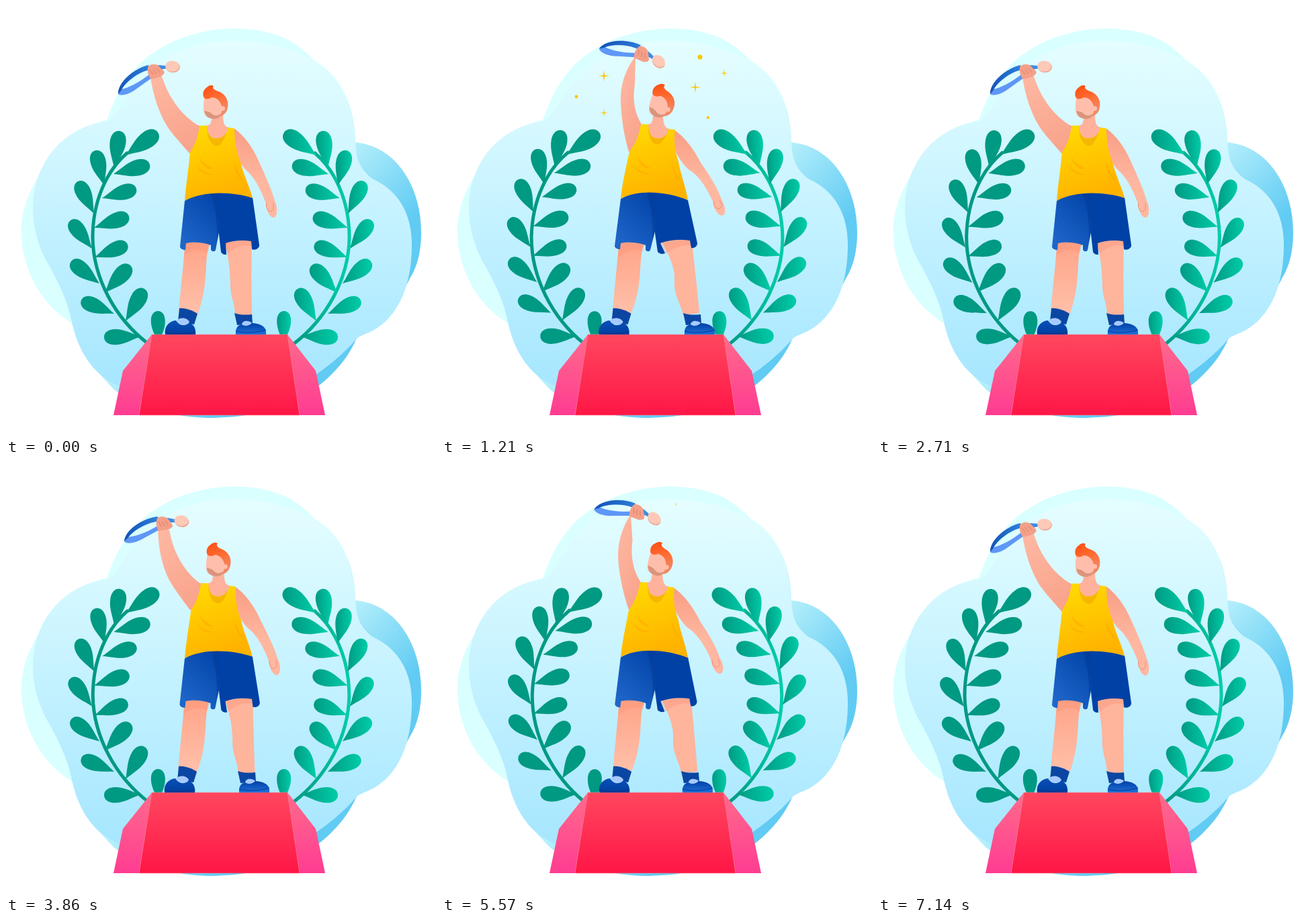
Recreate the animation shown at these times as an HTML page. Size 640 by 640 pixels, loop 7.21 s.

```html
<!DOCTYPE html>
<html lang="en">
<head>
<meta charset="utf-8">
<title>Winner on the podium</title>
<style>
  html, body { margin: 0; width: 100%; height: 100%; overflow: hidden; background: #fff; }
  svg { display: block; width: 100%; height: 100%; }
</style>
</head>
<body>
<svg viewBox="0 0 640 640" xmlns="http://www.w3.org/2000/svg">
  <defs>
    <linearGradient id="back" gradientUnits="userSpaceOnUse" x1="318" y1="318" x2="460" y2="460">
      <stop stop-color="#d9ffff"/><stop offset="1" stop-color="#61cbf3"/>
    </linearGradient>
    <linearGradient id="sky" gradientUnits="userSpaceOnUse" x1="0" y1="52" x2="0" y2="600">
      <stop stop-color="#e5feff"/><stop offset="1" stop-color="#a2e5ff"/>
    </linearGradient>
    <linearGradient id="leaf" x1="1" x2="0">
      <stop stop-color="#009a82"/><stop offset="1" stop-color="#00cda8"/>
    </linearGradient>
    <linearGradient id="front" x2="0" y2="1">
      <stop stop-color="#ff475f"/><stop offset="1" stop-color="#ff1646"/>
    </linearGradient>
    <linearGradient id="side" x2="0" y2="1">
      <stop stop-color="#ff6b8c"/><stop offset="1" stop-color="#ff3c92"/>
    </linearGradient>
    <linearGradient id="limb" x2="0" y2="1">
      <stop stop-color="#f99d84"/><stop offset=".6" stop-color="#ffb7a0"/>
    </linearGradient>
    <linearGradient id="leg" x2="0" y2="1">
      <stop stop-color="#ffa286"/><stop offset="1" stop-color="#ffc0aa"/>
    </linearGradient>
    <linearGradient id="raised" x2=".5" y2="1">
      <stop stop-color="#ffb9a4"/><stop offset="1" stop-color="#f9a48c"/>
    </linearGradient>
    <linearGradient id="shirtFill" x2=".3" y2="1">
      <stop stop-color="#ffdc00"/><stop offset="1" stop-color="#ffb300"/>
    </linearGradient>
    <linearGradient id="shortFill" x1="1" x2=".3" y2="1">
      <stop stop-color="#0041a6"/><stop offset="1" stop-color="#1f66c9"/>
    </linearGradient>
    <linearGradient id="shoe" x2="0" y2="1">
      <stop stop-color="#0a4fb8"/><stop offset="1" stop-color="#003f9f"/>
    </linearGradient>
    <linearGradient id="shoe2" x2="0" y2="1">
      <stop stop-color="#0041a6"/><stop offset="1" stop-color="#2170d8"/>
    </linearGradient>
    <linearGradient id="hair" x2=".4" y2="1">
      <stop stop-color="#ff4a10"/><stop offset=".5" stop-color="#ff6a30"/><stop offset="1" stop-color="#f08a66"/>
    </linearGradient>
    <linearGradient id="ribbon"><stop stop-color="#1353b8"/><stop offset="1" stop-color="#2f7fdb"/></linearGradient>
  </defs>

  <path fill="url(#back)" d="M150 170C168 120 190 84 235 60C280 34 350 24 405 44C428 52 444 66 460 82C500 105 519 150 520 203C580 208 618 268 618 338C618 365 612 388 602 404C580 450 540 470 522 494C505 535 470 565 440 582C400 605 350 613 300 613C240 611 190 595 160 570C130 540 110 510 98 472C60 450 23 400 23 335C23 290 45 255 70 222C100 190 130 172 150 170Z"/>
  <path fill="url(#sky)" d="M148 172C160 170 170 150 185 128C210 85 260 53 335 52C390 52 425 65 457 81C500 108 516 150 520 200C521 225 524 240 545 257C585 275 604 310 604 355C604 420 582 462 548 482C535 489 528 490 522 495C505 515 485 532 462 548C400 600 200 600 142 550C118 530 104 500 98 470C92 440 80 415 65 388C48 360 40 330 40 300C40 235 85 180 148 172Z"/>

  <g id="leftWreath" fill="#009982" stroke="#009982"></g>
  <g transform="translate(640 0) scale(-1 1)"><g id="rightWreath" fill="url(#leaf)" stroke="url(#leaf)"></g></g>

  <path fill="url(#side)" d="M217 489L174 543L160 609H198ZM419 489L461 543L475 609H437Z"/>
  <path fill="url(#front)" stroke="#ff7a8c" stroke-width=".6" d="M217 489H419L437 609H198Z"/>

  <path id="legL" fill="url(#leg)"/>
  <path id="legR" fill="#ffb49c"/>
  <path id="shadeL" fill="#f98f74" opacity=".35"/>
  <path id="shadeR" fill="#f98f74" opacity=".35"/>
  <g id="shoeL">
    <path fill="#0c46a3" d="M258 450C267 449 277 453 285 458L280 474L256 470Z"/>
    <path fill="url(#shoe)" d="M237 489C235 478 242 469 253 468C258 476 266 477 272 472C280 473 283 481 282 489Z"/>
    <path fill="#a6caff" d="M254 468C258 463 269 463 273 470C271 476 258 476 254 468Z"/>
    <path fill="none" stroke="#003282" d="M237 485C252 489 268 488 282 485"/>
  </g>
  <g id="shoeR">
    <path fill="#0c46a3" d="M340 457C348 460 357 460 366 459L367 473L344 475Z"/>
    <path fill="url(#shoe2)" d="M342 489C341 481 344 475 351 474C357 477 362 475 366 472C377 472 387 477 387 485V489Z"/>
    <path fill="#a6caff" d="M351 474C352 467 362 468 366 472C362 476 356 477 351 474Z"/>
    <path fill="none" stroke="#003a94" d="M342 484C354 487 372 487 387 482"/>
  </g>
  <path id="shortR" fill="#0041a6"/>
  <path id="shortL" fill="url(#shortFill)"/>
  <path id="crease" fill="#003993" opacity=".5"/>

  <path id="armL" fill="url(#raised)"/>
  <path id="armR" fill="url(#limb)"/>
  <path id="fingers" fill="none" stroke="#e98f7c" stroke-width="1"/>
  <path id="neck" fill="#ffb29b"/>
  <path id="shirt" fill="url(#shirtFill)"/>
  <path id="collar" fill="#f0a600" opacity=".6"/>
  <path id="folds" fill="#ffa500" opacity=".5"/>

  <g id="head">
    <path fill="#ffbeab" d="M295 136C294 146 293 155 296 162C300 169 315 170 323 160L326 146L314 128Z"/>
    <path fill="#d9957c" d="M295 156C299 157 303 157 306 160C310 164 316 164 321 159C321 164 316 168 310 168C303 168 297 165 295 156Z"/>
    <path fill="url(#hair)" d="M295 137C292 132 293 125 299 121C302 118 306 117 309 119C306 122 310 125 316 127C327 131 332 141 330 151C329 158 324 163 319 164C322 158 322 150 320 146C318 140 312 136 306 136C302 139 298 139 295 137Z"/>
    <circle cx="322.500" cy="152.500" r="3.500" fill="#ffbeab"/>
  </g>

  <g id="hand">
    <path fill="#5f97f7" d="M167 131C172 135 185 131 196 122L217 107L213 102C198 114 182 122 171 124Z"/>
    <path fill="url(#ribbon)" d="M212 88C190 93 166 114 167 131L172 125C177 114 196 99 213 95Z"/>
    <path fill="#3c8be2" d="M226 88L240 89L239 93L228 95Z"/>
    <ellipse cx="248.500" cy="91" rx="10.500" ry="8" fill="#eda58f"/>
    <ellipse cx="247.500" cy="89.500" rx="10.500" ry="8" fill="#ffc9b8"/>
    <path fill="#f4a089" d="M211 92C212 87 222 85 227 89L235 97C237 101 233 103 230 105L216 109C212 104 210 98 211 92Z"/>
    <path fill="none" stroke="#dd816d" d="M214 95L219 102M219 94L224 101M224 93L229 99"/>
  </g>
  <g id="sparks" fill="#ffc50a"></g>
</svg>

<script>
const LOOP = 7210, CYCLE = LOOP / 2;
const PIVOT = [288, 192], ARM_TURN = 39;
const $ = id => document.getElementById(id);

function add(parent, tag, attrs) {
  const node = document.createElementNS('http://www.w3.org/2000/svg', tag);
  for (const k in attrs) node.setAttribute(k, attrs[k]);
  return parent.appendChild(node);
}

// Leaves as base x, y, tip x, y.
const LEAVES = [
  [178, 222, 226, 188], [161, 241, 169, 186], [160, 250, 214, 236], [146, 267, 133, 215],
  [143, 286, 194, 272], [131, 309, 107, 261], [131, 330, 183, 313], [128, 361, 96, 319],
  [132, 374, 181, 355], [139, 413, 97, 380], [147, 427, 185, 386], [161, 458, 112, 438],
  [178, 469, 206, 421], [200, 492, 146, 493], [227, 503, 226, 454]
];

function leafPath([x, y, tx, ty]) {
  const dx = tx - x, dy = ty - y;
  return 'M0 0C.28 -.1 .45 -.215 .7 -.215C.88 -.215 1 -.13 1 0C1 .13 .88 .215 .7 .215C.45 .215 .28 .1 0 0Z'
    .replace(/(-?[\d.]+) (-?[\d.]+)/g, (_, u, v) =>
      `${(x + u * dx - v * dy).toFixed(1)} ${(y + u * dy + v * dx).toFixed(1)}`);
}

function growWreath(wreath) {
  add(wreath, 'path', {
    d: 'M212 503C162 465 130 405 129 345C129 290 150 245 180 219',
    fill: 'none', 'stroke-width': 5, 'stroke-linecap': 'round'
  });
  for (const leaf of LEAVES) add(wreath, 'path', { d: leafPath(leaf), stroke: 'none' });
}
growWreath($('leftWreath'));
growWreath($('rightWreath'));

// Each part: lowered pose, raised pose.
const POSES = {
  armL: ['M214 100C219 135 228 160 241 181C250 193 262 207 273 219L292 219L300 178L287 178C262 164 240 135 230 98Z',
         'M288 75C272 95 265 120 266 143C267 170 272 197 278 217L292 219L303 176L297 176C287 160 283 140 287 116C289 102 297 90 306 78Z'],
  armR: ['M339 182C355 192 370 215 378 235C387 255 396 275 400 290C405 300 404 312 399 315C392 315 388 305 387 294C380 275 370 255 358 245C350 237 345 228 340 215Z',
         'M345 184C362 195 376 215 386 235C397 250 410 270 416 288C423 300 423 311 416 312C409 310 404 300 403 291C395 272 382 252 368 244C358 236 350 222 344 210Z'],
  fingers: ['M388 293C386 300 390 306 394 306L398 303L398 293', 'M405 291C404 298 409 303 414 301L417 297L413 289'],
  neck: ['M306 160L323 160C323 175 325 180 333 181L325 202L304 202L297 178C305 178 306 174 306 160Z',
         'M314 160L329 160C329 175 331 182 339 183L332 202L312 202L304 176C312 177 314 173 314 160Z'],
  shirt: ['M288 178L299 178C300 190 303 197 313 197C323 197 329 190 331 181L340 182C340 200 342 215 349 232C353 250 363 270 367 286C340 277 295 274 266 290C268 265 272 240 274 218C281 207 286 195 288 178Z',
          'M296 176L307 176C308 189 311 197 321 197C331 197 336 191 337 183L347 184C345 200 346 215 352 232C355 250 363 270 366 289C340 278 295 271 266 287C268 265 274 240 279 217C287 206 293 195 296 176Z'],
  collar: ['M299 180C300 190 303 197 313 197C320 197 325 193 328 188C324 202 319 209 313 208C304 206 299 196 299 180Z',
           'M307 178C308 189 311 197 321 197C328 197 333 194 335 188C331 200 326 207 319 206C311 204 307 195 307 178Z'],
  folds: ['M287 222C291 232 299 237 309 242C301 244 290 239 287 222ZM284 235C287 244 298 249 309 250C297 254 286 247 284 235ZM339 231C342 243 350 252 355 262C345 256 339 244 339 231Z',
          'M290 221C294 231 301 237 311 241C302 243 293 238 290 221ZM285 234C288 243 299 248 310 249C298 253 287 246 285 234ZM342 231C344 243 351 252 356 262C347 256 342 244 342 231Z'],
  shortL: ['M266 290C288 276 306 277 316 278L318 331L312 363C311 366 307 366 305 363L305 356C292 351 278 351 268 353L267 363C263 363 259 361 259 358Z',
           'M266 287C288 275 306 276 316 278L318 331L310 363C309 366 305 366 303 363L303 356C290 351 275 351 266 353L265 362C261 362 257 360 257 357Z'],
  shortR: ['M312 277C335 276 352 280 367 285L377 356C377 361 371 364 366 362L365 350C352 348 338 349 327 353L328 370C325 370 322 370 320 366L316 331Z',
           'M312 277C335 277 352 282 366 289L380 353C380 358 375 361 371 360L369 349C355 347 338 348 325 353L332 368C328 370 324 369 321 366L316 331Z'],
  crease: ['M305 278L316 278L318 331L314 350C315 325 312 300 305 278Z', 'M305 277L316 278L318 331L313 350C315 325 312 300 305 277Z'],
  legL: ['M267 345L304 350C293 378 304 408 285 460C276 455 267 452 257 454C260 420 265 380 267 345Z',
         'M264 345L302 350C290 378 302 408 281 459C272 454 263 451 254 453C257 420 261 380 264 345Z'],
  legR: ['M324 345L366 342C365 380 365 420 366 461C357 462 349 461 341 459C340 440 333 430 334 412C333 395 333 380 324 345Z',
         'M325 345L371 342C375 380 380 420 383 457C375 458 367 459 359 460C356 445 345 430 346 412C347 395 345 385 325 345Z'],
  shadeL: ['M266 350L304 354L300 368C287 359 275 364 265 371Z', 'M264 350L302 354L298 366C285 358 272 368 262 375Z'],
  shadeR: ['M326 352L366 348L366 357C350 354 338 361 330 369Z', 'M325 352L371 347L372 357C355 354 342 362 333 369Z']
};

function turn(x, y, deg) {
  const a = deg * Math.PI / 180, c = Math.cos(a), s = Math.sin(a);
  const dx = x - PIVOT[0], dy = y - PIVOT[1];
  return [PIVOT[0] + dx * c - dy * s, PIVOT[1] + dx * s + dy * c];
}

// Blends two paths while swinging through an arc of deg.
function blend([from, to], p, deg = 0) {
  const pair = /([\d.]+) ([\d.]+)/g;
  const ends = [...to.matchAll(pair)];
  let i = 0;
  return from.replace(pair, (_, x, y) => {
    const [, ex, ey] = ends[i++];
    const [bx, by] = turn(+ex, +ey, -deg);
    return turn(+x + (bx - x) * p, +y + (by - y) * p, deg * p).map(n => n.toFixed(2)).join(' ');
  });
}

// x, y, radius, start, duration, dot
const SPARKS = [
  [241, 104, 8.5, 780, 860], [377, 121, 8.5, 780, 860], [241, 159, 6, 840, 800], [420, 100, 5.5, 800, 840],
  [200, 135, 3.3, 650, 760, true], [384, 76, 3.6, 870, 720, true], [396, 166, 2.2, 860, 720, true],
  [348, 60, 16, 1220, 790], [404, 135, 8, 1210, 770]
].map(([x, y, r, start, span, dot]) => ({
  x, y, r, start, span,
  node: dot ? add($('sparks'), 'circle', { r: 1 })
            : add($('sparks'), 'path', { d: 'M0 -1L.13 -.13L1 0L.13 .13L0 1L-.13 .13L-1 0L-.13 -.13Z' })
}));

const ramp = (t, a, b) => {
  const u = Math.min(1, Math.max(0, (t - a) / (b - a)));
  return u * u * (3 - 2 * u);
};
const move = (id, value) => $(id).setAttribute('transform', value);

function draw(ms) {
  const t = ms % CYCLE;
  const body = ramp(t, 0, 760) - ramp(t, 1750, 2600);
  const arm = ramp(t, 50, 800) - ramp(t, 1805, 2680);

  const sway = 1 - Math.cos(2 * Math.PI * t / CYCLE);
  for (const id of ['leftWreath', 'rightWreath']) move(id, `rotate(${sway} 216 500)`);

  for (const id in POSES) {
    const raised = id === 'armL';
    $(id).setAttribute('d', blend(POSES[id], raised ? arm : body, raised ? ARM_TURN : 0));
  }
  move('hand', `translate(${1.5 * arm} ${-5 * arm}) rotate(${ARM_TURN * arm} ${PIVOT})`);
  move('head', `translate(${9 * body} ${-body}) rotate(${15 * body} 316 172)`);
  move('shoeL', `translate(${-3.5 * body} 0)`);
  move('shoeR', `translate(${19 * body} 0)`);

  for (const s of SPARKS) {
    const u = (t - s.start) / s.span;
    const size = u > 0 && u < 1 ? s.r * Math.sin(Math.PI * u) : 0;
    s.node.setAttribute('transform', `translate(${s.x} ${s.y}) scale(${size})`);
  }
}

const begin = performance.now();
function tick() {
  draw((performance.now() - begin) % LOOP);
  requestAnimationFrame(tick);
}
tick();
</script>
</body>
</html>
```
